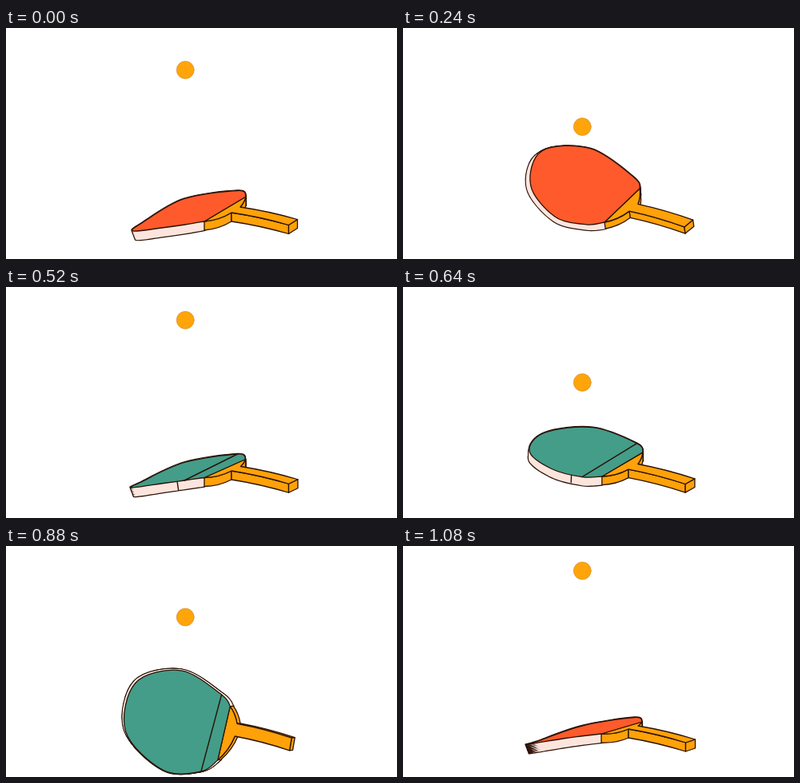
An HTML page for the animation above (1120 ms loop, 489 px wide and 289 px high).

```html
<!DOCTYPE html>
<html lang="en">
<head>
<meta charset="utf-8">
<title>Bouncing ball and flipping paddle</title>
<style>
  html, body { margin: 0; width: 100%; height: 100%; overflow: hidden; background: #fff; }
  svg { display: block; width: 100vw; height: 100vh; }
</style>
</head>
<body>
<svg id="stage" viewBox="0 0 489 289" stroke-linejoin="round" stroke-linecap="round"></svg>
<script>
const LOOP = 1120, STEP = 40, CYCLE = 580, SHORT_CYCLE = 540;
const RED = '#ff5a2b', GREEN = '#439d89', ORANGE = '#ffa108', RIM = '#fde5de', INK = '#2a1206';
const stage = document.getElementById('stage');

// Eight blade points (front chord end round to back chord end), front and back neck,
// handle vector, thickness at the blade tip, thickness at the neck.
const pose = text => text.split(' ').map(pair => pair.split(',').map(Number));
const edgeOn = pose('248,235 222,238 200,241 156,248 166,245 224,225 289,214.5 299,220 282,229 294,225 71.5,17 4,11 0,11');
const opening = pose('248,242 224,246 195,250 159,254 170,244 222,214 290,203.5 300,211 282,231 293,224 71.5,15.5 4,11 0,11');
const flat = pose('249,236 224,236 184,223 158,196 178,170 240,168 293,194 300,206 282,227.5 294,221 71,19 -2,10 0,10.5');
const raised = pose('248,233 225,231 188,218 164,184 178,149 240,151 295,188 301,201 282,226 295.5,220 69,20.5 -6,5 0,11');
const facing = pose('262,268 240,283 195,281 149,230 163,166 222,151 275,185 284,200 286,237 290,221 68,18 -2,-1 4,1');
const under = pose('282,266 268,276 205,277 154,246 156,203 200,185 237,192 258,204 288,244 283,230 70,16.5 0,-9 4,-9');

const add = (a, b, k = 1) => [a[0] + b[0] * k, a[1] + b[1] * k];
const mix = (a, b, k) => [a[0] + (b[0] - a[0]) * k, a[1] + (b[1] - a[1]) * k];
const str = p => p.map(v => v.toFixed(2)).join(' ');

const NECK_WEIGHT = [1, .7, .4, 0, 0, .4, .7, 1];
const bladeAt = (p, depth) => p.slice(0, 8).map((pt, i) => add(pt, mix(p[11], p[12], NECK_WEIGHT[i]), depth));

// The same solid, described from its other face.
function turnOver(p) {
  const negate = v => [-v[0], -v[1]];
  return [...bladeAt(p, 1).reverse(), add(p[9], p[12]), add(p[8], p[12]), p[10], negate(p[11]), negate(p[12])];
}

const keys = [[0, edgeOn], [40, opening], [160, flat], [300, raised], [370, facing],
  [440, under], [460, under], [CYCLE, turnOver(edgeOn)]];

function poseAt(phase) {
  const i = Math.max(1, keys.findIndex(k => k[0] > phase));
  const [t0, a] = keys[i - 1], [t1, b] = keys[i];
  return a.map((pt, j) => mix(pt, b[j], (phase - t0) / (t1 - t0)));
}

const area = pts => pts.reduce((sum, p, i) => {
  const q = pts[(i + 1) % pts.length];
  return sum + p[0] * q[1] - q[0] * p[1];
}, 0);

function smooth(pts) {
  let d = 'M' + str(pts[0]);
  for (let i = 0; i < pts.length - 1; i++) {
    const a = pts[i], b = pts[i + 1], before = pts[i - 1] || a, after = pts[i + 2] || b;
    const c1 = add(a, add(b, before, -1), 1 / 6), c2 = add(b, add(after, a, -1), -1 / 6);
    d += `C${str(c1)} ${str(c2)} ${str(b)}`;
  }
  return d + 'Z';
}

const shape = (d, fill, width = 1.3) =>
  `<path d="${d}" fill="${fill}" stroke="${INK}" stroke-width="${width}"/>`;
const line = (a, b) => shape(`M${str(a)}L${str(b)}`, 'none', 1.4);

function handle(p) {
  const [front, back] = [p[0], p[7]], [n1, n2, reach, , d] = p.slice(8);
  const h1 = add(n1, reach), h2 = add(n2, reach);
  const outward = (a, b) => [a[1] - b[1], b[0] - a[0]];
  const bulge = (a, b) => add(mix(a, b, .5), outward(a, b), .12);
  const lift = (a, b) => add(mix(a, b, .5), [0, -2.5]);
  const edges = [[n2, bulge(n2, back), back], [front, bulge(front, n1), n1], [n1, lift(n1, h1), h1],
    [h2, lift(h2, n2), n2], [h1, mix(h1, h2, .5), h2]];
  const sides = edges.filter(([a, , b]) => {
    const o = outward(a, b);
    return o[0] * d[0] + o[1] * d[1] > 0;
  }).map(([a, c, b]) => shape(
    `M${str(a)}Q${str(c)} ${str(b)}L${str(add(b, d))}Q${str(add(c, d))} ${str(add(a, d))}Z`, ORANGE));
  const order = [edges[1], edges[2], edges[4], edges[3], edges[0]];
  const top = 'M' + str(front) + order.map(([, c, b]) => `Q${str(c)} ${str(b)}`).join('') + 'Z';
  return sides.join('') + shape(top, ORANGE);
}

function paddle(p, isRed) {
  if (area(p.slice(0, 8)) < 0) {
    p = turnOver(p);
    isRed = !isRed;
  }
  const layers = Array.from({ length: 9 }, (_, i) => smooth(bladeAt(p, i / 8)));
  const face = p.slice(0, 8), rear = bladeAt(p, 1);
  let out = layers.map(d => shape(d, RIM, 2.4)).join('');
  out += layers.map(d => `<path d="${d}" fill="${RIM}"/>`).join('');
  const seamShown = isRed ? p[12][1] < 0 : p[12][1] > 0;
  if (seamShown) {
    const [i, j] = isRed ? [6, 5] : [1, 2];
    out += line(mix(face[i], face[j], .35), mix(rear[i], rear[j], .35));
  }
  out += handle(p) + shape(smooth(face), isRed ? RED : GREEN);
  if (!isRed) out += line(face[1], face[6]);
  return out;
}

function ball(phase) {
  const left = CYCLE - phase;
  const fall = .5 * phase + .00094 * phase * phase;
  const rise = .07 * left + .0011 * left * left;
  const y = 31 + Math.min(fall, rise);
  return `<circle cx="224.3" cy="${y.toFixed(2)}" r="11" fill="#ffa50a" stroke="#c98a3c" stroke-width=".6"/>`;
}

// The first flip is a little shorter: its middle runs faster.
function shortPhase(u) {
  if (u < 160) return u;
  return u < 260 ? 160 + (u - 160) * 1.4 : u + 40;
}

function render(time) {
  const u = (Math.floor(time / STEP) * STEP + 40) % LOOP;
  const isRed = u < SHORT_CYCLE;
  const phase = isRed ? shortPhase(u) : u - SHORT_CYCLE;
  stage.innerHTML = paddle(poseAt(phase), isRed) + ball(phase);
}

const start = performance.now();
function tick() {
  render((performance.now() - start) % LOOP);
  requestAnimationFrame(tick);
}
tick();
</script>
</body>
</html>
```
